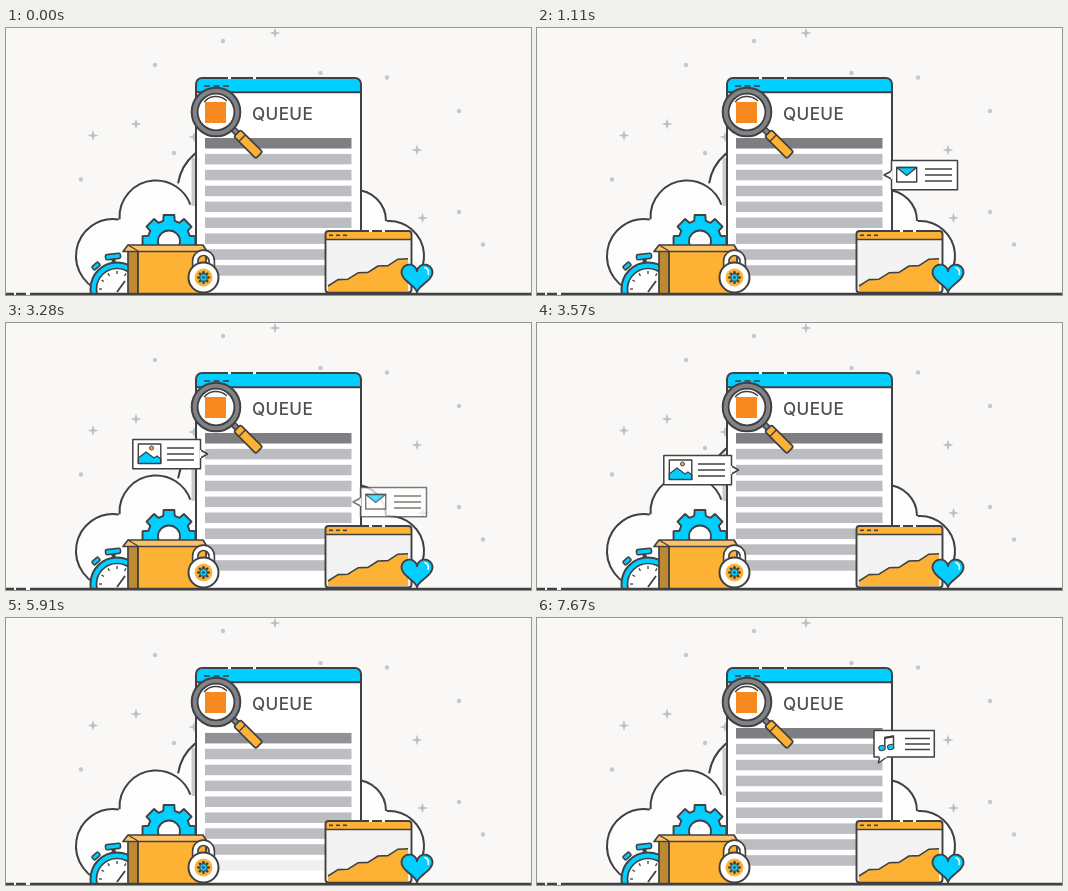
Recreate the animation shown at these times as an HTML page with a canvas. Size 525 by 267 pixels, loop 8 s.

```html
<!DOCTYPE html>
<html lang="en">
<head>
<meta charset="utf-8">
<title>Message queue</title>
<style>
html, body { margin: 0; width: 100%; height: 100%; overflow: hidden; background: #f9f8f6; }
canvas { display: block; width: 525px; height: 267px; }
</style>
</head>
<body>
<canvas id="stage"></canvas>
<script>
const W = 525, H = 267, LOOP = 8000, PI = Math.PI;
const INK = '#414042', CYAN = '#00cfff', ORANGE = '#fdb235', GREY = '#808285', PAPER = '#ffffff', SKY = '#f9f8f6';
const ROW_DARK = 126, ROW_LIGHT = 188, ROW_GAP = 15.9;
const FIRST_STEP = 170, STEP_GAP = 820, TICK = 30, TICKS = 5;

const canvas = document.getElementById('stage');
const dpr = window.devicePixelRatio || 1;
canvas.width = W * dpr;
canvas.height = H * dpr;
const c = canvas.getContext('2d');

const ease = k => Math.sin(k / TICKS * PI / 2);
const FADE_HINT = ease(1);
const polar = (x, y, r, a) => [x + r * Math.cos(a), y + r * Math.sin(a)];
const series = (n, f) => Array.from({ length: n }, (_, i) => f(i));

function paint(fill, stroke, width = 2) {
  if (fill) { c.fillStyle = fill; c.fill(); }
  if (stroke) { c.strokeStyle = stroke; c.lineWidth = width; c.stroke(); }
}

function poly(points, fill, stroke, width, open) {
  c.beginPath();
  points.forEach(([x, y]) => c.lineTo(x, y));
  if (!open) c.closePath();
  paint(fill, stroke, width);
}

function line(x1, y1, x2, y2, width = 2, color = INK) {
  poly([[x1, y1], [x2, y2]], null, color, width, true);
}

function arc(x, y, r, from, to, fill, stroke, width) {
  c.beginPath();
  c.arc(x, y, r, from * PI, to * PI);
  paint(fill, stroke, width);
}

const disc = (x, y, r, fill, stroke, width) => arc(x, y, r, 0, 2, fill, stroke, width);

function box(x, y, w, h, r, fill, stroke, width) {
  c.beginPath();
  c.roundRect(x, y, w, h, r);
  paint(fill, stroke, width);
}

function at(x, y, angle, draw) {
  c.save();
  c.translate(x, y);
  c.rotate(angle);
  draw();
  c.restore();
}

// Horizontal dashes at a fixed pitch.
function dashes(x, y, pitch, w) {
  for (let i = 0; i < 3; i++) line(x + i * pitch, y, x + i * pitch + w, y, 1.6);
}

function sparkle(x, y) {
  poly(series(8, i => polar(x, y, i % 2 ? 1.9 : 5.6, i * PI / 4)), '#bfc0c2');
}

function sky() {
  c.fillStyle = SKY;
  c.fillRect(0, 0, W, H);
  [[269, 5], [130, 96], [87, 107.5], [411, 122], [416.5, 190], [188, 109]].forEach(p => sparkle(...p));
  [[217, 13], [149, 37], [381, 49.5], [314.5, 45], [453, 83], [168, 125], [75, 151.5], [453, 184], [477, 216.5]]
    .forEach(([x, y]) => disc(x, y, 2.2, '#c6c7c9'));
}

function lobe(x, y, r, from, to) {
  disc(x, y, r, '#fdfdfd');
  arc(x, y, r, from, to, null, INK, 2);
}

function clouds() {
  lobe(220, 163, 48.5, 1.05, 1.5);
  box(185.5, 130, 5, 48, 0, '#c9cacc');
  lobe(107, 228, 37, 0.55, 1.55);
  lobe(349, 193, 31, 1.5, 2);
  lobe(383, 228, 35, 1.48, 2.4);
  box(110, 205, 275, 60, 0, '#fdfdfd');
  lobe(150, 189, 36.5, 0.98, 1.89);
}

function page() {
  const top = [6, 6, 0, 0];
  box(190, 50, 165, 218, top, PAPER);
  box(190, 50, 165, 14, top, CYAN);
  line(190, 64.3, 355, 64.3, 1.9);
  box(190, 50, 165, 218, top, null, INK, 2);
  [222, 247].forEach(x => line(x, 50, x + 3, 50, 2.2, SKY));
  dashes(198, 58, 9.5, 6);
  c.fillStyle = '#4f5053';
  c.font = '500 17.2px Inter, sans-serif';
  c.letterSpacing = '0.35px';
  c.fillText('QUEUE', 246, 92);
}

function rows(p) {
  c.save();
  c.beginPath();
  c.rect(199, 110, 147, 143);
  c.clip();
  for (let k = -1; k < 9; k++) {
    const v = ROW_DARK + (ROW_LIGHT - ROW_DARK) * Math.max(0, Math.min(1, k + p));
    c.globalAlpha = k === 8 ? (1 - p) ** 4 : 1;
    c.fillStyle = `rgb(${v}, ${v + 1}, ${v + 4})`;
    c.fillRect(199, 110 + ROW_GAP * (k + p), 146.5, 10.5);
  }
  c.restore();
}

function magnifier() {
  at(210, 84, PI / 4, () => {
    box(24, -2.5, 8, 5, 0, GREY, INK, 1.5);
    box(30, -4.7, 31, 9.4, 2, ORANGE, INK, 1.7);
    line(37, -4.7, 37, 4.7, 1.4);
  });
  disc(210, 84, 24.3, GREY, INK, 2);
  disc(210, 84, 18.4, PAPER, INK, 1.8);
  arc(210, 84, 15.5, 1.22, 1.75, null, INK, 1.4);
  c.fillStyle = '#f6891f';
  c.fillRect(199, 74, 21, 21);
}

function stopwatch() {
  const x = 111, y = 261;
  line(107, 228, 108, 236, 4);
  at(107, 228.5, -0.12, () => box(-7.5, -2.6, 15, 5.2, 1.5, CYAN, INK, 1.6));
  at(90, 238, -0.72, () => box(-4, -2.2, 8, 4.4, 1, CYAN, INK, 1.5));
  disc(x, y, 26.5, CYAN, INK, 2);
  disc(x, y, 20.5, PAPER, INK, 1.7);
  series(7, i => (1 + i / 6) * PI).forEach(a => line(...polar(x, y, 15, a), ...polar(x, y, 18, a), 1.3));
  line(111, 264, 119, 253, 1.8);
}

function gear() {
  const teeth = series(32, i => {
    const side = i % 4 < 2 ? -1 : 1, tip = i % 4 === 1 || i % 4 === 2;
    return polar(163, 213.5, tip ? 27 : 21.5, Math.floor(i / 4) * PI / 4 + side * (tip ? 0.2 : 0.27));
  });
  poly(teeth, CYAN, INK, 1.9);
  disc(163, 213.5, 11, '#fdfdfd', INK, 1.8);
}

function crate() {
  box(122, 223, 10, 44, 0, '#bd8a31', INK, 1.7);
  box(132, 223, 68, 44, 0, ORANGE, INK, 1.8);
  poly([[122, 217], [197, 217], [201, 223.5], [117, 223.5]], '#fdc268', INK, 1.7);
  line(132, 223, 122, 217, 1.4);
}

function padlock() {
  const x = 197.5, y = 249.5;
  [[INK, 7], [PAPER, 3.8]].forEach(([color, width]) => {
    c.beginPath();
    c.arc(x, 233, 8.2, PI, 0);
    c.lineTo(x + 8.2, 240);
    c.moveTo(x - 8.2, 233);
    c.lineTo(x - 8.2, 240);
    paint(null, color, width);
  });
  disc(x, y, 15, PAPER, INK, 2);
  disc(x, y, 9, ORANGE);
  series(8, i => polar(x, y, 5.2, i * PI / 4)).forEach(p => disc(...p, 1.3, INK));
  disc(x, y, 3.8, CYAN, INK, 1.2);
  disc(x, y, 1.3, INK);
}

function chart() {
  const top = [3, 3, 0, 0];
  box(319.5, 203, 86, 61.5, 3, '#f3f3f4');
  box(319.5, 203, 86, 8.5, top, ORANGE);
  const trend = series(9, i => [322 + 10 * i, 258 - 3.4 * i - 3 * (i % 2)]);
  poly([...trend, [402, 263], [322, 263]], ORANGE);
  poly(trend, null, INK, 1.6, true);
  line(319.5, 211.5, 405.5, 211.5, 1.6);
  box(319.5, 203, 86, 61.5, 3, null, INK, 1.9);
  [363, 376].forEach(x => line(x, 203, x + 3, 203, 2, SKY));
  dashes(323, 207.3, 7, 4);
}

function heart() {
  poly(series(60, i => {
    const a = i * PI / 30;
    return [411 + 15.5 * Math.sin(a) ** 3,
            248 - 0.96 * (13 * Math.cos(a) - 5 * Math.cos(2 * a) - 2 * Math.cos(3 * a) - Math.cos(4 * a))];
  }), CYAN, INK, 1.9);
  arc(417.5, 244.5, 5, 1.55, 2.15, null, PAPER, 1.6);
}

function ground() {
  [[0, 8], [10, 20], [24, W]].forEach(([from, to]) => line(from, 265.9, to, 265.9, 2.3));
}

// Speech card: a box whose border opens between a and b into a pointed tail.
function card(x, w, h, a, tip, b) {
  box(x, 0.5, w, h, 0, PAPER, INK, 1.5);
  line(...a, ...b, 1.7, PAPER);
  poly([a, tip, b], PAPER, INK, 1.5, true);
  line(...a, ...b, 1, PAPER);
}

function textLines(x, y, w, gap) {
  for (let i = 0; i < 3; i++) line(x, y + i * gap, x + w, y + i * gap, 1.5);
}

function mailCard() {
  card(354.5, 66, 29.3, [354.5, 11], [347, 15], [354.5, 19]);
  box(359.7, 7.5, 20, 14.5, 0, PAPER, INK, 1.4);
  poly([[359.7, 7.5], [369.7, 15.5], [379.7, 7.5]], CYAN, INK, 1.3);
  textLines(388, 9, 27, 6);
}

function imageCard() {
  card(126.8, 67.7, 29.3, [194.5, 11], [201.5, 15], [194.5, 19]);
  poly([[132.3, 19], [140, 13], [148, 19], [151, 17], [154.8, 20], [154.8, 24.5], [132.3, 24.5]], CYAN, INK, 1.2);
  disc(145.5, 9, 2, ORANGE, INK, 1);
  box(132.3, 5, 22.5, 19.5, 0, null, INK, 1.4);
  textLines(161, 9, 27, 6);
}

function musicCard() {
  card(337, 60.3, 26.5, [342.5, 27], [341.5, 33], [350, 27]);
  poly([[347.8, 17.5], [347.8, 7.5], [356.5, 6], [356.5, 16]], null, INK, 1.5, true);
  line(347.8, 8, 356.5, 6.5, 2.2);
  [[345, 18], [353.7, 17]].forEach(([x, y]) => at(x, y, -0.3, () => box(-3.2, -2.5, 6.4, 5, 2.5, CYAN, INK, 1.1)));
  textLines(368, 8.5, 25, 5.5);
}

function show(draw, y, alpha) {
  if (alpha <= 0) return;
  c.save();
  c.globalAlpha = Math.min(1, alpha);
  c.translate(0, y);
  draw();
  c.restore();
}

// Whole queue steps done plus the eased part of the current one.
function stepsAt(t) {
  if (t < FIRST_STEP) return 0;
  const n = Math.floor((t - FIRST_STEP) / STEP_GAP);
  const tick = Math.floor((t - FIRST_STEP - n * STEP_GAP) / TICK) + 1;
  return tick >= TICKS ? n + 1 : n + ease(tick);
}

// A card hints its fade ahead of a step and completes it during the step.
const fadeIn = (t, start, p) => t < start ? 0 : FADE_HINT + (1 - FADE_HINT) * Math.max(0, p);
const fadeOut = (t, start, p) => t < start ? 1 : (1 - FADE_HINT) * (1 - p);

function render(t) {
  const s = stepsAt(t);
  c.setTransform(dpr, 0, 0, dpr, 0, 0);
  c.lineJoin = 'round';
  sky();
  clouds();
  page();
  rows(s % 1);
  [magnifier, stopwatch, gear, crate, padlock, chart, heart, ground].forEach(draw => draw());

  show(mailCard, 116 + 16 * (s - 1), Math.min(fadeIn(t, 820, s - 1), fadeOut(t, 3280, s - 4)));
  show(imageCard, 100 + 16 * (s - 3), Math.min(s - 3, 7 - s));
  show(musicCard, 80 + 16 * (s - 8), fadeIn(t, 6560, s - 8));
}

const start = performance.now();
function frame() {
  render((performance.now() - start) % LOOP);
  requestAnimationFrame(frame);
}
frame();
</script>
</body>
</html>
```
